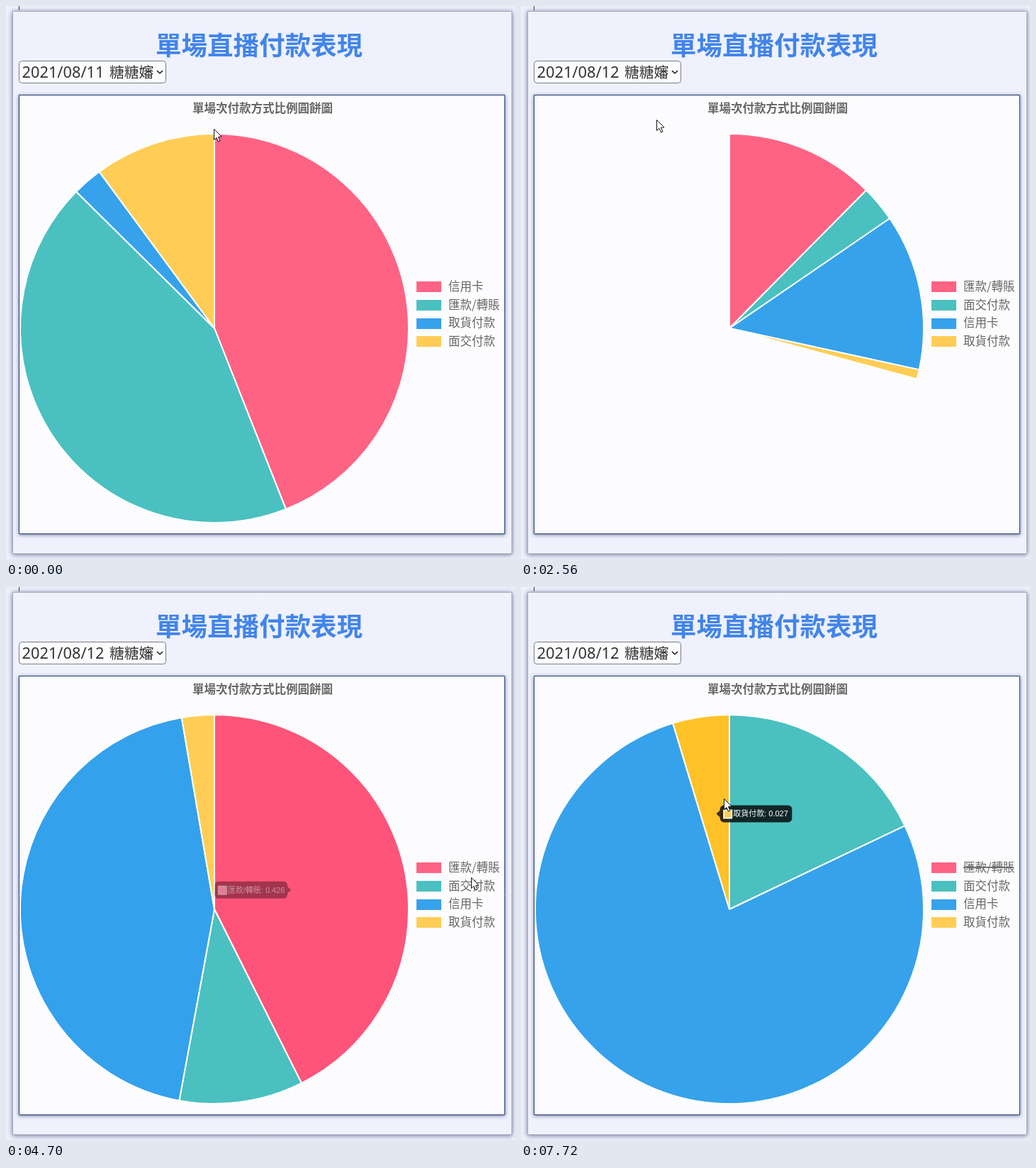
An HTML page with a canvas that plays this animation: 718 px wide and 779 px high, repeating every 8.11 s.

```html
<!DOCTYPE html>
<html lang="zh-Hant">
<head>
<meta charset="utf-8">
<style>
html, body { margin: 0; width: 718px; height: 779px; overflow: hidden; background: #eff1fd; }
canvas { display: block; }
</style>
</head>
<body>
<canvas id="stage" width="718" height="779"></canvas>
<script>
const ctx = document.getElementById('stage').getContext('2d');
const LOOP = 8110, SWITCH = 2470, HIDE = 4950;
const CX = 294, CY = 454, R = 274;
const CJK = '"Noto Sans CJK TC", "Noto Sans CJK", sans-serif';
const GREY = '#666';

const base = [[255, 99, 132], [75, 192, 192], [54, 162, 235], [255, 205, 86]];
const hover = [[255, 61, 103], [36, 207, 207], [25, 152, 247], [255, 193, 40]];
const days = [
  { date: '2021/08/11', labels: ['信用卡', '匯款/轉賬', '取貨付款', '面交付款'], values: [.44, .434, .025, .101] },
  { date: '2021/08/12', labels: ['匯款/轉賬', '面交付款', '信用卡', '取貨付款'], values: [.426, .103, .444, .027] }
];

// Hovered slice over time, -1 for none
const hovers = [[200, 0], [550, 1], [888, 2], [925, 3], [1050, -1], [3080, 0], [3500, 1], [3750, 2],
  [4475, 0], [4630, -1], [6390, 2], [7420, 3]];

// Pointer path: time, x, y
const path = [
  [0, 293, 173], [130, 293, 173], [300, 400, 290], [470, 400, 480], [600, 290, 590], [760, 150, 470],
  [870, 150, 330], [920, 186, 276], [1150, 190, 100], [1300, 195, 95], [1900, 195, 95], [2400, 192, 160],
  [2560, 191, 160], [2800, 200, 175], [3230, 366, 298], [3400, 420, 480], [3550, 350, 630], [3750, 265, 620],
  [4000, 140, 480], [4300, 170, 440], [4475, 290, 432], [4700, 655, 409], [4950, 650, 395], [5500, 655, 396],
  [6000, 671, 413], [6200, 650, 430], [6400, 555, 480], [6750, 400, 600], [7050, 180, 520], [7250, 170, 330],
  [7450, 250, 270], [7640, 285, 296], [7720, 286, 298]
];

const clamp = v => Math.min(1, Math.max(0, v));
const mix = (a, b, p) => a + (b - a) * p;
const easeOut = v => 1 - (1 - clamp(v)) ** 4;
const sum = a => a.reduce((s, v) => s + v, 0);
const dayAt = t => days[t < SWITCH ? 0 : 1];

function shares(t) {
  const { values } = dayAt(t);
  if (t < SWITCH) return values;
  if (t < HIDE) {
    const p = easeOut((t - SWITCH) / 1100);
    return values.map(v => v * p);
  }
  const p = easeOut((t - HIDE) / 1000), rest = 1 - values[0];
  return values.map((v, i) => mix(v, i ? v / rest : 0, p));
}

function setTipFont() {
  ctx.font = '11px "Liberation Sans", ' + CJK;
}

function tipLabel(i, t) {
  const day = dayAt(t);
  return day.labels[i] + ': ' + day.values[i].toFixed(3);
}

function tipTarget(i, t) {
  const s = shares(t);
  const angle = (sum(s.slice(0, i)) + s[i] / 2) * 2 * Math.PI;
  const x = CX + Math.sin(angle) * R / 2, y = CY - Math.cos(angle) * R / 2;
  setTipFont();
  const w = ctx.measureText(tipLabel(i, t)).width + 24;
  const flip = x > 361;
  return { i, w, flip, x: flip ? x - 7 - w : x + 7, y, label: tipLabel(i, t) };
}

// Fold the hover events up to t into tooltip and highlight state
function hoverState(t) {
  let s = { alpha: 0, heat: [0, 0, 0, 0] };
  hovers.forEach(([start, i], k) => {
    if (start > t) return;
    const end = Math.min(t, k + 1 < hovers.length ? hovers[k + 1][0] : LOOP);
    const p = easeOut((end - start) / 400);
    const next = { ...s, alpha: mix(s.alpha, i < 0 ? 0 : 1, p), heat: s.heat.map((h, j) => mix(h, j === i ? 1 : 0, p)) };
    if (i >= 0) {
      const to = tipTarget(i, start);
      const from = s.alpha > .02 ? s : to;
      Object.assign(next, to);
      for (const key of ['x', 'y', 'w']) next[key] = mix(from[key], to[key], p);
    }
    s = next;
  });
  return s;
}

function pointerAt(t) {
  const last = path.length - 1;
  if (t >= path[last][0]) return path[last].slice(1);
  const k = path.findIndex((p, i) => t < path[i + 1][0]);
  const [a, b, c, d] = [-1, 0, 1, 2].map(o => path[Math.min(last, Math.max(0, k + o))]);
  const u = (t - b[0]) / (c[0] - b[0]);
  return [1, 2].map(n => b[n] + u / 2 * (c[n] - a[n]
    + u * (2 * a[n] - 5 * b[n] + 4 * c[n] - d[n] + u * (3 * (b[n] - c[n]) + d[n] - a[n]))));
}

function text(str, x, midY, size, color, align = 'left', weight = 400) {
  ctx.font = `${weight} ${size}px ${CJK}`;
  ctx.fillStyle = color;
  ctx.textAlign = align;
  ctx.fillText(str, x, midY + size * .38);
}

function panel(x, y, w, h, fill, border, blur) {
  ctx.save();
  ctx.shadowColor = 'rgba(40,50,90,.65)';
  ctx.shadowBlur = blur;
  ctx.shadowOffsetY = 1;
  ctx.fillStyle = fill;
  ctx.fillRect(x, y, w, h);
  ctx.restore();
  ctx.strokeStyle = border;
  ctx.lineWidth = 1;
  ctx.strokeRect(x + .5, y + .5, w - 1, h - 1);
}

function page(day) {
  ctx.fillStyle = '#eff1fd';
  ctx.fillRect(0, 0, 718, 779);
  ctx.fillStyle = '#33364a';
  ctx.fillRect(18, 0, 1, 6);
  panel(9, 7, 705, 765, '#eff1fd', '#a3a6b6', 7);
  text('單場直播付款表現', 357, 55.5, 36.5, '#4285ea', 'center', 700);

  ctx.beginPath();
  ctx.roundRect(18.5, 77.5, 207, 31, 4);
  ctx.fillStyle = '#fcfcfe';
  ctx.fill();
  ctx.strokeStyle = '#77798a';
  ctx.stroke();
  ctx.font = '21.8px "Noto Sans", "Open Sans", sans-serif';
  ctx.fillStyle = '#333';
  ctx.textAlign = 'left';
  ctx.fillText(day.date, 22.5, 101);
  text('糖糖嬸', 146, 93, 20.7, '#333');
  ctx.beginPath();
  ctx.moveTo(213, 91);
  ctx.lineTo(217, 95);
  ctx.lineTo(221, 91);
  ctx.strokeStyle = '#222';
  ctx.lineWidth = 1.7;
  ctx.stroke();

  panel(18, 125, 686, 619, '#fcfcfe', '#253f70', 5);
  text('單場次付款方式比例圓餅圖', 362, 144, 16.5, GREY, 'center', 700);
}

const sliceColor = (i, heat = 0) => `rgb(${base[i].map((c, n) => Math.round(mix(c, hover[i][n], heat)))})`;

function pie(t, heat) {
  let angle = -Math.PI / 2;
  ctx.lineWidth = 2;
  ctx.lineJoin = 'bevel';
  ctx.strokeStyle = '#fff';
  shares(t).forEach((share, i) => {
    if (share < .0005) return;
    const end = angle + share * 2 * Math.PI;
    ctx.beginPath();
    ctx.moveTo(CX, CY);
    ctx.arc(CX, CY, R, angle, end);
    ctx.closePath();
    ctx.fillStyle = sliceColor(i, heat[i]);
    ctx.fill();
    ctx.stroke();
    angle = end;
  });
}

function legend(t, labels) {
  labels.forEach((label, i) => {
    const y = 394.7 + i * 25.7;
    ctx.fillStyle = sliceColor(i);
    ctx.fillRect(579, Math.round(y - 6.5), 35, 15);
    text(label, 624, y, 16.5, GREY);
  });
  if (t >= HIDE) {
    ctx.fillStyle = GREY;
    ctx.fillRect(624, 394, 70, 1.8);
  }
}

function tooltip({ alpha, i, x, y, w, flip, label }) {
  if (alpha < .01) return;
  ctx.save();
  ctx.globalAlpha = alpha;
  ctx.fillStyle = 'rgba(0,0,0,.8)';
  const edge = flip ? x + w : x, tip = flip ? edge + 5 : edge - 5;
  ctx.beginPath();
  ctx.roundRect(x, y - 12, w, 24, 5.5);
  ctx.fill();
  ctx.beginPath();
  ctx.moveTo(edge, y - 5);
  ctx.lineTo(tip, y);
  ctx.lineTo(edge, y + 5);
  ctx.fill();
  ctx.fillStyle = '#fff';
  ctx.fillRect(x + 4.5, y - 6, 13, 13);
  ctx.fillStyle = sliceColor(i);
  ctx.fillRect(x + 6.3, y - 4.2, 9.4, 9.4);
  setTipFont();
  ctx.textAlign = 'left';
  ctx.fillStyle = '#fff';
  ctx.fillText(label, x + 18.5, y + 4);
  ctx.restore();
}

function pointer([x, y]) {
  ctx.save();
  ctx.translate(Math.round(x) + .5, Math.round(y) + .5);
  ctx.beginPath();
  [[0, 0], [0, 15], [3.5, 12], [6, 17.5], [8.5, 16.5], [6, 11], [10.5, 10.5]].forEach(p => ctx.lineTo(...p));
  ctx.closePath();
  ctx.fillStyle = '#fff';
  ctx.fill();
  ctx.strokeStyle = '#111';
  ctx.lineWidth = 1;
  ctx.stroke();
  ctx.restore();
}

function draw(now) {
  const t = now % LOOP, day = dayAt(t), state = hoverState(t);
  page(day);
  pie(t, state.heat);
  legend(t, day.labels);
  tooltip(state);
  pointer(pointerAt(t));
}

const began = performance.now();
function tick() {
  draw(performance.now() - began);
  requestAnimationFrame(tick);
}
tick();
</script>
</body>
</html>
```
